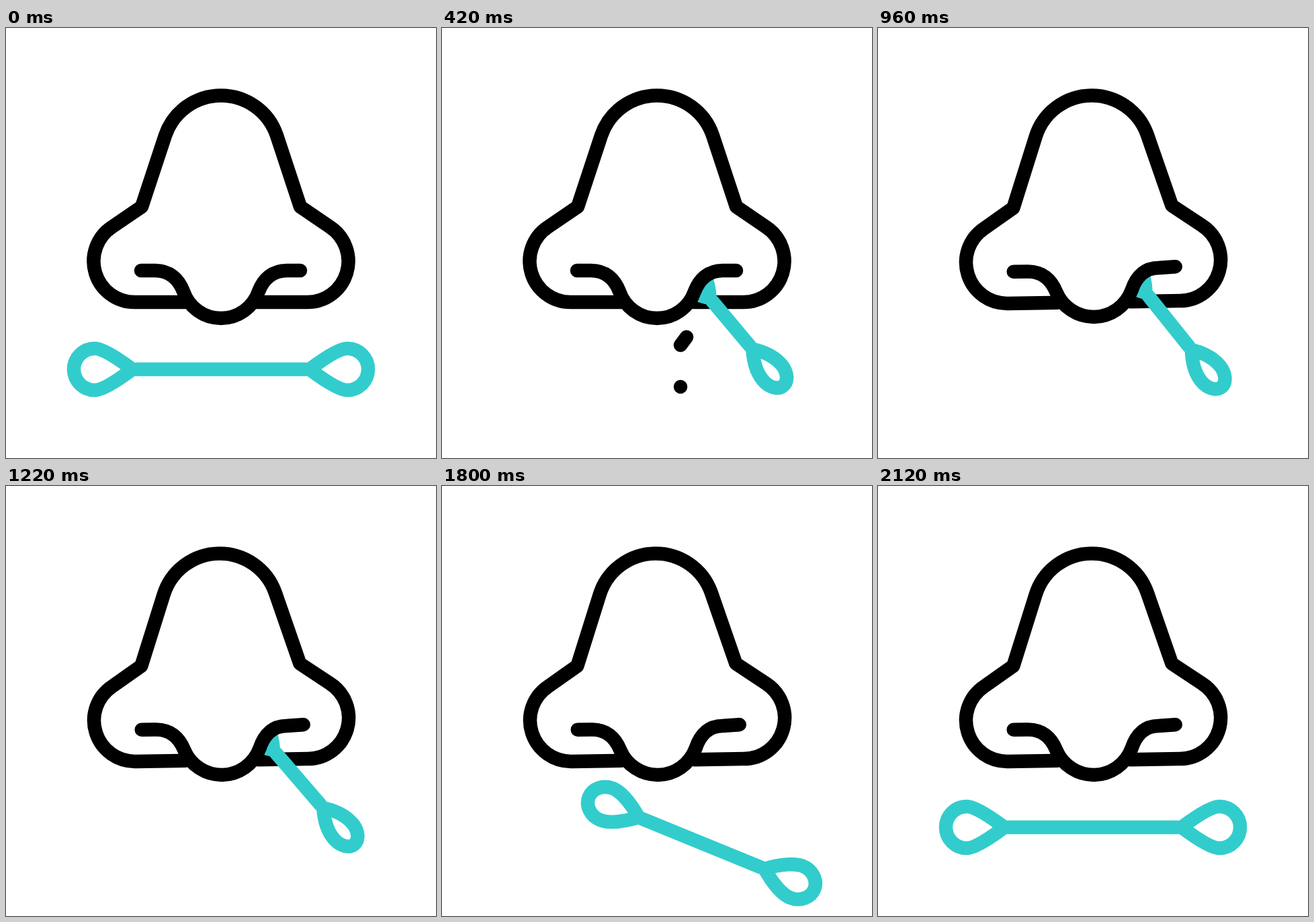
An HTML page that plays this animation: 640x640 px, repeating every 2420 ms.

```html
<!DOCTYPE html>
<html lang="en">
<head>
<meta charset="utf-8">
<title>Nasal swab</title>
<style>
  html, body { margin: 0; width: 100%; height: 100%; overflow: hidden; background: #fff; }
  svg { display: block; width: 100%; height: 100%; }
  path { fill: none; stroke-width: 20.5; stroke-linecap: round; stroke-linejoin: round; }
  .ink { stroke: #000; }
  .swab { stroke: #3cc; }
</style>
</head>
<body>
<svg viewBox="0 0 640 640">
  <clipPath id="below"><path id="mask"/></clipPath>
  <path id="outline" class="ink" d="M266 408H192A61 61 0 0 1 158 296L202 266L237 160A87.6 87.6 0 0 1 403 160L438 266L482 296A61 61 0 0 1 448 408H374"/>
  <g clip-path="url(#below)"><g id="swab" class="swab">
    <path id="bar"/><path id="near"/><path id="far"/>
  </g></g>
  <path id="septum" class="ink"/>
  <path id="drops" class="ink"/>
</svg>
<script>
const LOOP = 2420, STEP = 20;
const LEAVE_HOME = 60, INSIDE = 420, PULL_OUT = 1660, BACK_HOME = 2120;

const el = id => document.getElementById(id);
const set = (id, name, value) => el(id).setAttribute(name, value);
const mix = (a, b, u) => a + (b - a) * u;
const part = (t, from, to) => Math.min(1, Math.max(0, (t - from) / (to - from)));
const smooth = u => u * u * (3 - 2 * u);

// teardrop starting at the bar's end; it gets slimmer as p goes to 1
function bulb(p) {
  const w = 31 - 13 * p, len = 93 - 16 * p, k = len / 93;
  const early = w * (.68 + .25 * p), bend = w * .55;
  return `M6 0C${34 * k} ${-early} ${52 * k} ${-w} ${62 * k} ${-w}`
    + `C${79 * k} ${-w} ${len} ${-bend} ${len} 0`
    + `C${len} ${bend} ${79 * k} ${w} ${62 * k} ${w}`
    + `C${52 * k} ${w} ${34 * k} ${early} 6 0Z`;
}

function drawSwab(t) {
  const leaving = t > PULL_OUT;
  // p: 0 at rest, 1 inside the nostril
  const p = leaving
    ? (1 - part(t, PULL_OUT, BACK_HOME)) ** 2.3
    : smooth(part(t, LEAVE_HOME, INSIDE));
  const arc = 4 * p * (1 - p);
  const drift = part(t, INSIDE, PULL_OUT);
  const sway = Math.cos((t - 300) / 840 * 2 * Math.PI);

  const x = mix(446, 456 + 14 * drift + 4 * sway, p) + (leaving ? 18 : 0) * arc;
  const y = mix(508, 473.5 + 2 * drift, p) + (leaving ? 75 : 60) * arc;
  const angle = (52 - 3.3 * sway) * p;
  const length = mix(252, 87 + 23 * drift, p);

  const shape = bulb(p);
  set("swab", "transform", `translate(${x} ${y}) rotate(${angle})`);
  set("bar", "d", `M${-length} 0H0`);
  set("near", "d", shape);
  set("far", "d", shape);
  set("far", "transform", `translate(${-length} 0) scale(-1 1)`);
}

function drawNose(t) {
  const q = smooth(part(t, INSIDE, 600));
  const r = 59.2 + 1.1 * q, rim = 361 - 2.5 * q;
  const curve = `201 361H222C244 361 257 374 264 392A${r} ${r} 0 0 0 376 392`
    + `C383 ${374 - 2 * q} ${396 - q} ${rim} ${418 - q} ${rim}L${438 + 4 * q} ${361 - 4 * q}`;
  set("septum", "d", "M" + curve);
  set("mask", "d", `M-50 361L${curve}H700V700H-50Z`);
  for (const id of ["outline", "septum", "mask"]) {
    set(id, "transform", `rotate(${-.85 * q} 320 310)`);
  }
}

// each drop streaks out from its top, then its tail catches up
function drawDrops(t) {
  const streak = i => {
    const start = 340 + 80 * i;
    if (t < start || t >= start + 160) return "";
    const at = u => `${364 - 9 * (i + u)} ${460 + 74 * i + 12 * u}`;
    return `M${at(part(t, start + 80, start + 160))}L${at(part(t, start, start + 80))}`;
  };
  set("drops", "d", streak(0) + streak(1));
}

function frame(now) {
  const t = Math.floor(now % LOOP / STEP) * STEP;
  drawSwab(t);
  drawNose(t);
  drawDrops(t);
  requestAnimationFrame(frame);
}
frame(0);
</script>
</body>
</html>
```
